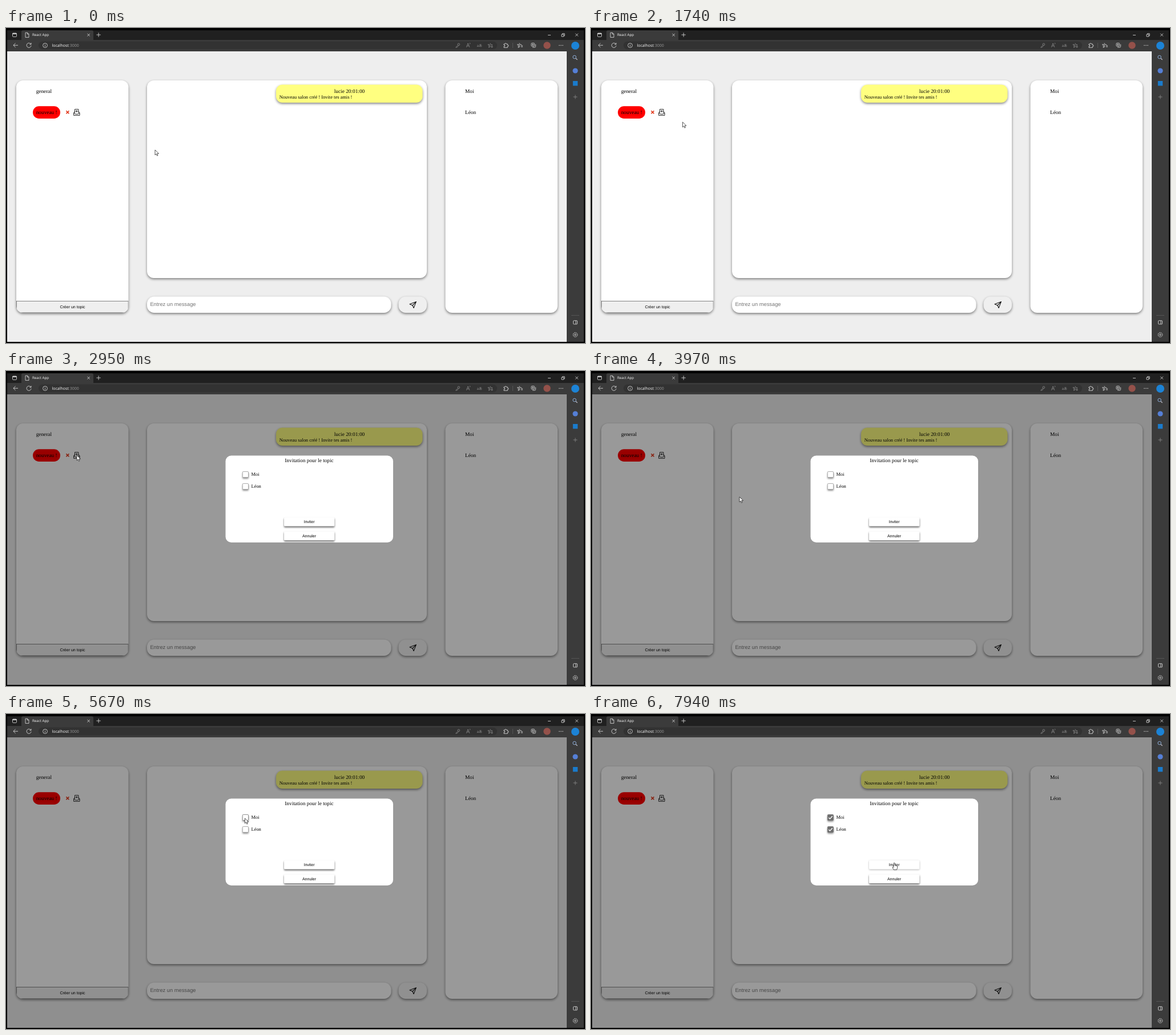
An HTML page that plays this animation: 1014x553 px, repeating every 8 s.

```html
<!DOCTYPE html>
<html lang="fr">
<head>
<meta charset="utf-8">
<title>React App</title>
<style>
  html, body { margin: 0; width: 100%; height: 100%; overflow: hidden; background: #000; }
  svg { display: block; width: 1014px; height: 553px; }
  text { font: 9.3px "Liberation Serif", "Times New Roman", serif; text-rendering: geometricPrecision; white-space: pre; }
  .small { font-size: 8.45px; }
  .sans { font: 7.04px "Liberation Sans", Arial, sans-serif; }
  .hint { font: 9.3px "Liberation Sans", Arial, sans-serif; fill: #757575; }
  .ui { font: 6.2px "Open Sans", "Noto Sans", sans-serif; fill: #fff; }
  .mid { text-anchor: middle; }
  .card { fill: #fff; filter: drop-shadow(0 2.6px 2px rgba(0, 0, 0, .48)); }
  .line { fill: none; stroke: #e4e4e4; stroke-width: .8; }
  .dim { stroke: #8f8f8f; }
  .ink { fill: none; stroke: #111; stroke-width: .9; stroke-linejoin: round; }
  .box { fill: #fff; stroke: #767676; stroke-width: .6; }
  .tick { fill: none; stroke: #fff; stroke-width: 1.4; visibility: hidden; }
  .check { filter: drop-shadow(0 2.4px 1.8px rgba(0, 0, 0, .45)); }
  .hover .box { stroke: #4a4a4a; }
  .pressed .box { stroke: #8d8d8d; }
  .on .box { fill: #6e6e6e; stroke: #6e6e6e; }
  .on.hover .box { fill: #505050; stroke: #505050; }
  .on .tick { visibility: visible; }
  .btn { fill: #fff; filter: drop-shadow(0 2.2px 1.7px rgba(0, 0, 0, .6)); }
  .btn.hover { filter: drop-shadow(0 1.6px 1.6px rgba(0, 0, 0, .3)); }
  .pointer { fill: #fff; stroke: #111; stroke-width: .7; stroke-linejoin: round; }
</style>
</head>
<body>
<svg viewBox="0 0 1014 553">
  <clipPath id="panel"><rect x="18" y="92" width="196.5" height="408" rx="12"/></clipPath>

  <!-- browser window -->
  <rect x="2" y="4" width="1010" height="18" fill="#202020"/>
  <rect x="2" y="21" width="1010" height="530" fill="#3b3b3b"/>
  <path d="M27 22V7q0-3 3-3H150q3 0 3 3V22Z" fill="#3b3b3b"/>
  <rect x="57" y="23.5" width="803" height="14" rx="7" fill="#323232"/>
  <text class="ui" x="46" y="14.3">React App</text>
  <text class="ui" x="80.5" y="32.8" style="font-size:7px">localhost<tspan fill="#9a9a9a">:3000</tspan></text>

  <g class="line">
    <rect x="11.5" y="9" width="7" height="6.4" rx="1.2"/>
    <path d="M11.5 10h7" stroke-width="1.6"/>
    <path d="M34 8.2h3.6l2.4 2.4v5.8h-6ZM37.4 8.2v2.6H40"/>
    <path d="M142.4 10l4.4 4.4m0-4.4l-4.4 4.4M158.4 12h7.4m-3.7-3.7v7.4"/>
    <path d="M949 12.5h5M973 11.2h3.8V15H973ZM974.3 11V9.8h3.9v3.9H977"/>
    <path d="M997.2 9.7l4.8 4.8m0-4.8l-4.8 4.8"/>
    <path d="M21 30.3h-8m3.6-3.6l-3.7 3.6l3.7 3.6"/>
    <path d="M43.6 28.4a4 4 0 1 0 .5 2.4M44 26v2.7h-2.7"/>
    <circle cx="68.5" cy="30.5" r="3.9"/>
    <path d="M68.5 30v2.6m0-4.3v.9"/>
    <path d="M872 28h1.8a1.2 1.2 0 1 1 2.4 0h2.1v2a1.2 1.2 0 1 1 0 2.2v2.2H872v-2.2a1.2 1.2 0 1 0 0-2.2Z"/>
    <path d="M899 26.5l1.2 2.6l2.8.3m-3 3.2l-3 1.7l.6-3.2l-2.2-2l2.8-.3ZM902 31h3m-3 2h3"/>
    <rect x="920" y="26.5" width="5.6" height="5.6" rx="1.2"/>
    <path d="M922 33.9h4q1.6 0 1.6-1.6V28.6M922.8 27.6v3.4m-1.7-1.7h3.4"/>
    <path d="M993.5 121h7m-3.5-3.5v7" class="dim"/>
    <rect x="993.5" y="513.7" width="7" height="6.2" rx="1"/>
    <path d="M998 513.7v6.2"/>
    <circle cx="997" cy="538.5" r="1.4"/>
    <circle cx="997" cy="538.5" r="3.8" stroke-dasharray="2.4 .6"/>
  </g>
  <g class="line dim">
    <circle cx="792.8" cy="28.8" r="1.8"/>
    <path d="M791.6 30.2l-4 3.8h2.2l2.6-2.6"/>
    <path d="M806.4 33.8l2.7-7l2.7 7m-4.5-2.4h3.5M812 28.4q2-1.2 0-2.4"/>
    <path d="M848 26.6l1.2 2.6l2.8.3l-1.8 1.8m-2 1.3l-2.6 1.7l.5-3.2l-2.2-2l2.9-.3ZM849.2 33h3.6m-1.8-1.8v3.6"/>
    <path d="M887.5 26v9M990 504.5h14" stroke="#5c5c5c"/>
  </g>
  <text class="ui" x="824.4" y="33" style="fill:#8f8f8f">aあ</text>
  <g fill="#e4e4e4"><circle cx="969" cy="30.5" r=".7"/><circle cx="972" cy="30.5" r=".7"/><circle cx="975" cy="30.5" r=".7"/></g>
  <circle cx="947.5" cy="30.5" r="6.2" fill="#94514a"/>
  <circle cx="997" cy="31" r="7" fill="#1c83d6"/>
  <circle cx="995.6" cy="51" r="2.8" fill="none" stroke="#8fb0dc"/>
  <path d="M997.8 53.2l2.8 2.6" stroke="#b9b9c4" stroke-width="1.3"/>
  <circle cx="997" cy="75" r="4.6" fill="#557fd6"/>
  <rect x="992.8" y="93" width="8.4" height="8.4" fill="#1a7bcb"/>

  <!-- chat page -->
  <rect x="2" y="41" width="980" height="510" fill="#eee"/>
  <rect class="card" x="18" y="92" width="196.5" height="408" rx="12"/>
  <rect class="card" x="247" y="92" width="490" height="347" rx="12"/>
  <rect class="card" x="769.5" y="92" width="196.5" height="408" rx="12"/>
  <rect class="card" x="247" y="471.5" width="427.5" height="28.5" rx="12.5"/>
  <rect class="card" x="687.5" y="471.5" width="49.5" height="28.5" rx="12.5" style="fill:#efefef"/>
  <rect class="card" x="473" y="99.5" width="256.5" height="31.5" rx="11" style="fill:#ffff80"/>
  <rect x="18.4" y="479.4" width="195.8" height="20.4" fill="#efefef" stroke="#666" stroke-width=".8" clip-path="url(#panel)"/>
  <rect x="47" y="137.3" width="48" height="21.7" rx="10.8" fill="red"/>

  <text x="52.7" y="113.8">general</text>
  <text x="52.7" y="151">nouveau !</text>
  <text x="804" y="113.8">Moi</text>
  <text x="804" y="151">Léon</text>
  <text class="mid" x="601.5" y="113.8">lucie 20:01:00</text>
  <text class="small" x="478.7" y="123.8">Nouveau salon créé ! Invite tes amis !</text>
  <text class="sans mid" x="116.5" y="492">Créer un topic</text>
  <text class="hint" x="252.4" y="488.3">Entrez un message</text>

  <path d="M105.4 145.4l5 5m0-5l-5 5" stroke="#e23a1e" stroke-width="1.5"/>
  <g class="ink">
    <path d="M120.5 149.3v-6.6h6.4v6.6M123.7 144.2v3.8m-1.9-1.9h3.8"/>
    <path d="M120.5 146.6l-1.9 2v4.8h10.4v-4.8l-2.1-2M118.6 149.2l3.2 2h4l3.2-2"/>
    <path d="M718.4 480.4L707 484.8l5 2.2l2 4.5ZM712 487l6.4-6.6" stroke-width="1.1"/>
  </g>

  <!-- invitation dialog -->
  <g id="modal" visibility="hidden">
    <rect x="2" y="41" width="980" height="510" fill="#000" opacity=".4"/>
    <rect x="384.5" y="148.5" width="293.5" height="152.5" rx="10" fill="#fff"/>
    <text class="mid" x="531" y="160.4">Invitation pour le topic</text>
    <g class="check" id="first" transform="translate(414 176.3)">
      <rect class="box" x=".3" y=".3" width="10.2" height="10.2" rx="1.3"/>
      <path class="tick" d="M2.3 5.6l2.2 2.2l4.2-4.8"/>
    </g>
    <g class="check" id="second" transform="translate(414 197.3)">
      <rect class="box" x=".3" y=".3" width="10.2" height="10.2" rx="1.3"/>
      <path class="tick" d="M2.3 5.6l2.2 2.2l4.2-4.8"/>
    </g>
    <text class="small" x="429.5" y="184.2">Moi</text>
    <text class="small" x="429.5" y="205.2">Léon</text>
    <rect class="btn" id="invite" x="487" y="257" width="88.3" height="15.6" rx="1.5"/>
    <rect class="btn" x="487" y="281.6" width="88.3" height="15.6" rx="1.5"/>
    <text class="sans mid" x="531" y="267.4">Inviter</text>
    <text class="sans mid" x="531" y="292">Annuler</text>
  </g>

  <path class="pointer" id="pointer"/>
</svg>

<script>
  const LOOP = 8000, OPEN = 2950;
  const ARROW = "M0 0V9L2.1 7.1L3.5 10.3L5 9.6L3.6 6.6L6.5 6.4Z";
  const HAND = "M-1 1Q-1 0 0 0Q1 0 1 1V4.5L4.4 5.2Q5.5 5.5 5.5 6.5V9L4.4 12.2H-.8L-2.8 8.7Q-3.3 7 -2 7L-1 8Z";

  // start, end, number of steps, points along the way
  const moves = [
    [390, 1120, 9, [[261, 214], [290, 204], [370, 184], [470, 169.5], [548, 185], [569, 225], [530, 253.5], [455, 236], [379.5, 206], [301, 205]]],
    [1210, 2010, 10, [[301, 205], [235, 196], [188, 180], [155, 162], [136.3, 152.3]]],
    [2110, 2380, 4, [[136.3, 152.3], [129, 150], [124, 148]]],
    [3790, 4500, 9, [[124.5, 148.5], [185, 185], [300, 235], [410, 242], [480, 205], [503.7, 173]]],
    [4600, 4770, 3, [[503.7, 173], [515.7, 168.3]]],
    [4950, 5670, 9, [[515.7, 168.3], [490, 171], [450, 177], [425, 181], [418.3, 183]]],
    [6030, 6210, 3, [[418.3, 183], [418.3, 203.7]]],
    [7320, 7940, 8, [[418.3, 203.7], [440, 218], [490, 245], [525, 258.5], [531, 261.3]]]
  ];

  const $ = id => document.getElementById(id);
  const [modal, first, second, invite, pointer] = ["modal", "first", "second", "invite", "pointer"].map($);

  // Catmull-Rom curve through the points
  function along(pts, u) {
    const last = pts.length - 1;
    const i = Math.min(last - 1, Math.floor(u * last));
    const f = u * last - i;
    const [a, b, c, d] = [i - 1, i, i + 1, i + 2].map(k => pts[Math.max(0, Math.min(last, k))]);
    return [0, 1].map(k => b[k] + f / 2 * (c[k] - a[k]
      + f * (2 * a[k] - 5 * b[k] + 4 * c[k] - d[k] + f * (3 * (b[k] - c[k]) + d[k] - a[k]))));
  }

  function position(t) {
    const move = moves.findLast(m => t >= m[0]);
    if (!move) return moves[0][3][0];
    const [start, end, n, pts] = move;
    const step = Math.min(n, Math.floor((t - start) / (end - start) * (n - 1) + 1.08));
    return along(pts, step / n);
  }

  const inside = ([x, y], l, t, r, b) => x >= l && x <= r && y >= t && y <= b;

  function draw(t) {
    const open = t >= OPEN;
    const p = position(t);
    const onInvite = open && inside(p, 487, 257, 575, 273);
    const onIcon = !open && inside(p, 118, 142, 130, 154);

    modal.setAttribute("visibility", open ? "visible" : "hidden");
    first.classList.toggle("hover", inside(p, 414, 176, 425, 187));
    first.classList.toggle("on", t >= 5850);
    second.classList.toggle("hover", inside(p, 414, 197, 425, 208));
    second.classList.toggle("pressed", t >= 6580 && t < 6680);
    second.classList.toggle("on", t >= 6680);
    invite.classList.toggle("hover", onInvite);
    pointer.setAttribute("d", onInvite || onIcon ? HAND : ARROW);
    pointer.setAttribute("transform", `translate(${p[0]} ${p[1]})`);
  }

  const begin = performance.now();
  function tick() {
    draw((performance.now() - begin) % LOOP);
    requestAnimationFrame(tick);
  }
  tick();
</script>
</body>
</html>
```
